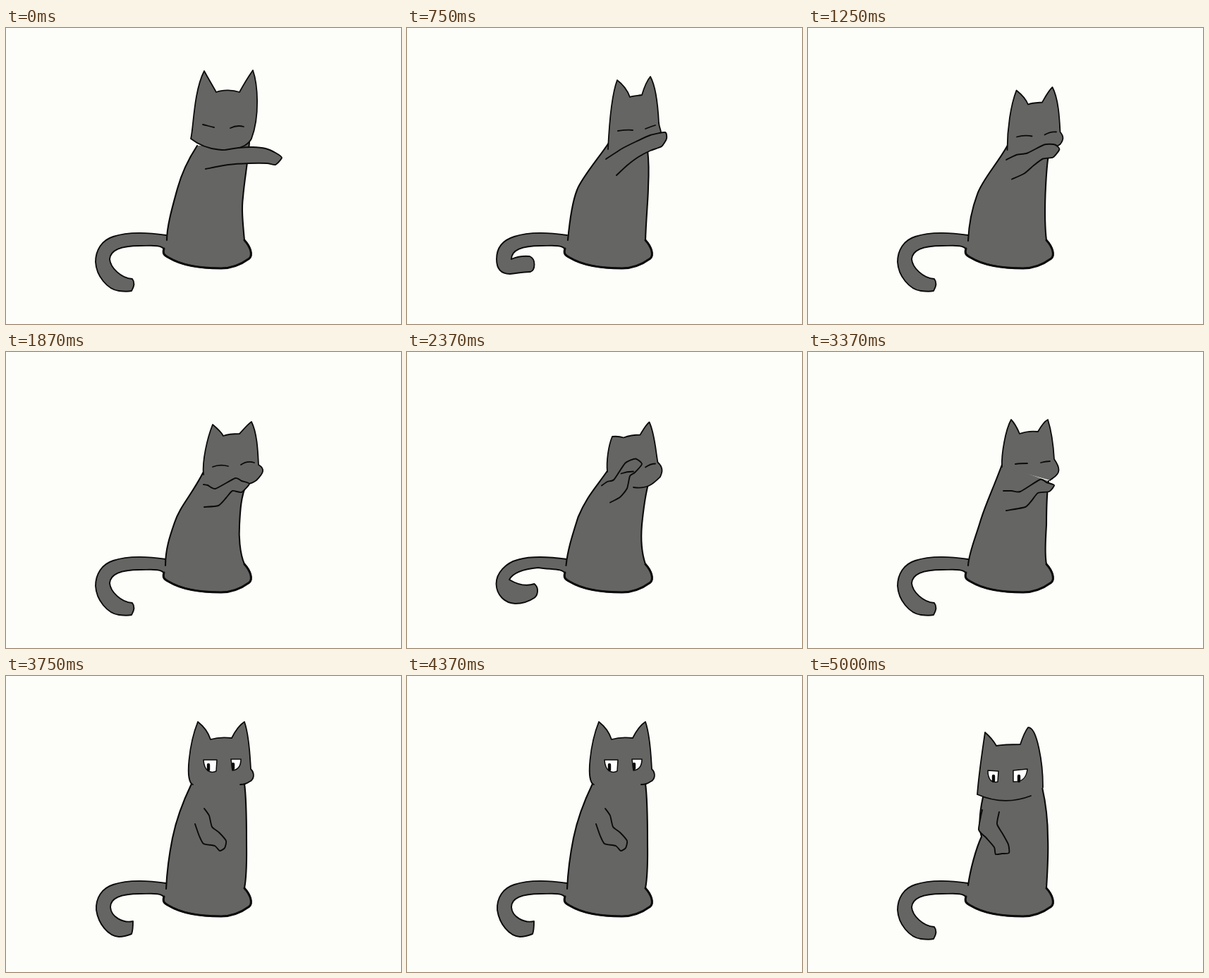
Animation of 560 by 420 pixels, one loop 5.25 s. Source, as an HTML page with a canvas:

```html
<!DOCTYPE html>
<html lang="en">
<head>
<meta charset="utf-8">
<title>Cat washing itself</title>
<style>
html, body { margin: 0; width: 100%; height: 100%; overflow: hidden; background: #fdfef9; }
canvas { display: block; }
</style>
</head>
<body>
<canvas id="stage" width="560" height="420"></canvas>
<script>
const ctx = document.getElementById('stage').getContext('2d');
const FUR = '#656563', PAPER = '#fdfef9', INK = '#0b0b0b';
const LOOP = 5250, STEP = 125;

const BASE = 'M224 313C222 319 223 322 231 326C246 335 268 341 305 341C322 341 334 335 345 327C350 322 347 311 338 301';
const MARKS = 'M206 85L226 89M213 58L232 73M236 40L243 62';

// A pose: body sides, head outline with chin, arm points, closed lids, open eyes, pupils
const pose = (left, right, head, arm, lids, whites = '', pupils = '') =>
  ({ body: left + BASE + right, head, arm, lids, whites, pupils });

const lick = pose(
  'M271 167C254 193 246 217 243 228C235 257 228 282 228 301',
  'C335 270 334 255 336 240C338 215 343 190 345 162',
  'M262 157C266 142 266 90 281 61C287 72 293 82 298 91C308 87 322 88 331 91C337 80 343 70 350 60C357 80 360 125 348 157C346 161 343 164 338 167M338 167C318 177 285 175 262 157',
  '311 173 330 170 350 169 368 171 382 177 391 184 382 194 370 192 345 192 315 194 283 200',
  'M279 137C284 138 290 140 295 141M318 142C324 139 330 138 337 140');

const wipe = pose(
  'M286 163C273 183 247 213 241 230C233 250 230 280 228 301',
  'C339 270 342 240 342 225C343 205 343 190 341 173',
  'M285 172C287 130 290 95 298 74C306 80 312 87 316 98C320 96 328 96 333 95C336 85 340 75 345 69C354 85 356 115 357 135C358 142 360 145 360 148M360 148C345 158 322 166 300 180',
  '282 186 305 171 325 161 345 152 366 148 368 157 361 168 345 174 328 183 312 195 297 209',
  'M299 146C306 145 313 144 320 145M338 143C343 141 348 139 352 138');

const nibble = pose(
  'M280 170C262 205 247 218 239 242C232 262 226 280 226 303',
  'C331 285 330 260 331 245C332 225 333 205 341 187',
  'M280 174C278 155 285 123 293 103C299 108 305 113 308 119C316 116 324 116 331 116C337 110 342 103 348 99C356 115 357 140 358 160C368 166 365 172 355 182M355 182C350 186 345 187 341 188',
  '280 188 286 189 297 194 325 179 334 183 345 187 334 199 321 197 312 207 301 218 281 220',
  'M293 163C300 160 308 160 315 162M333 160C340 155 346 155 352 157');

const ear = pose(
  'M289 166C275 178 262 192 246 227C238 255 229 282 225 303',
  'C334 285 333 265 335 245C338 225 341 210 342 192',
  'M288 166C287 155 286 143 289 137C293 131 300 127 306 124C314 121 322 119 330 119C332 112 335 104 339 100C346 115 348 140 353 153C357 160 361 166 363 172M363 172C350 186 338 203 301 196',
  '272 191 282 179 290 168 294 136 314 120 321 131 312 143 311 155 312 180 303 194 295 207',
  'M314 182C318 181 322 179 327 177M343 167C346 165 349 162 352 160');

const finish = pose(
  'M275 160C260 200 253 213 245 238C237 265 228 285 227 303',
  'C335 285 337 265 338 245C338 225 338 205 341 183',
  'M275 163C274 145 280 110 288 96C294 102 297 109 300 116C308 113 318 112 326 113C330 106 334 99 340 96C346 115 348 135 349 152C358 165 358 172 347 179M347 179C346 180 344 181 343 182',
  '277 197 289 197 301 198 329 181 338 185 349 189 342 198 326 200 317 211 308 220 281 225',
  'M294 159C300 158 306 158 311 158M330 157C334 156 339 155 343 155');

const glance = pose(
  'M263 153C250 180 241 205 236 230C231 255 228 280 227 302',
  'C342 280 341 255 341 235C341 200 341 175 338 153',
  'M265 154C253 150 260 95 272 65C281 72 287 81 290 90C300 87 312 87 320 88C325 78 330 70 338 65C345 85 346 115 347 132C353 138 352 147 345 150M345 150C341 153 336 154 332 154',
  '281 188 288 198 292 214 302 222 312 234 310 244 303 248 296 241 280 238 274 227 268 210',
  '',
  'M280 119L299 119L298 135C292 138 281 137 280 119ZM319 118L333 118C333 127 330 133 321 134Z',
  'M287 126L287 133M322 125L322 131');

const stare = pose(
  'M248 172C243 195 242 215 246 228C238 245 230 275 227 297',
  'C339 285 341 250 340 230C340 200 337 180 332 158',
  'M240 168C241 155 245 120 251 80C258 86 263 92 267 99C278 97 290 97 301 97C304 88 308 78 312 73C325 72 333 125 333 156C333 157 333 157 333 158M316 170C290 180 265 179 240 168',
  '271 193 268 210 276 224 284 239 285 251 275 252 266 253 264 243 253 230 242 218 247 190',
  '',
  'M255 134L270 135L269 150C262 152 255 149 255 134ZM291 134L311 132C310 143 304 151 291 150Z',
  'M263 142L263 149M299 142L299 149');

// Tail: upper edge, bend, tip, inner edge; the last point only tucks the fill under the body
const tail = bend => 'M227 294C205 291 ' + bend + 'C205 309 220 307 224 314M236 305';
const low = tail('176 288 152 296C136 301 127 315 127 332C128 352 144 371 160 373C168 374 174 374 178 373C181 368 183 361 179 356C163 355 148 340 147 328C148 314 165 309 190 309');
const hook = tail('176 288 152 296C136 301 127 312 127 328C127 342 134 349 146 349C156 348 164 346 175 346C182 343 183 328 174 324C164 323 157 324 148 328C148 314 165 309 190 309');
const curl = tail('183 289 164 293C144 297 126 312 126 326C126 339 134 342 147 341C158 340 172 334 184 324C191 320 191 307 182 302C174 311 162 318 143 318C152 312 166 307 182 303');
const lift = tail('176 288 152 296C136 301 127 315 128 332C131 352 145 369 160 370C166 370 173 368 178 366C180 361 180 355 180 348C166 351 149 342 148 328C148 314 165 309 190 309');

// Blends the numbers of two like-built strings; unlike ones switch halfway
function mix(a, b, k) {
  const to = b.match(/[\d.]+/g) || [];
  if ((a.match(/[\d.]+/g) || []).length !== to.length) return k < 0.5 ? a : b;
  let n = 0;
  return a.replace(/[\d.]+/g, v => +v + (to[n++] - v) * k);
}

const blend = (a, b, k) =>
  Object.fromEntries(Object.keys(a).map(key => [key, mix(a[key], b[key], k)]));

const poses = [
  [0, lick], [3, { ...blend(lick, wipe, 0.25), arm: lick.arm }], [5, lick],
  [6, wipe], [8, wipe], [12, nibble], [14, blend(nibble, wipe, 0.15)], [15, nibble],
  [18, ear], [20, nibble], [22, ear], [23, ear], [26, finish], [27, finish],
  [30, glance], [35, glance], [38, stare]
];
const tails = [
  [0, low], [5, low], [6, hook], [7, hook], [10, low], [15, low], [18, curl], [20, low],
  [22, curl], [23, curl], [26, low], [28, low], [30, lift], [32, curl], [35, lift], [38, low]
];

function at(track, step, join) {
  const n = track.findIndex(([s]) => s > step);
  if (n < 0) return track[track.length - 1][1];
  const [s0, a] = track[n - 1], [s1, b] = track[n];
  return join(a, b, (step - s0) / (s1 - s0));
}

// Soft curve through a string of points
function smooth(text) {
  const v = text.split(' ').map(Number), last = v.length / 2 - 1;
  const get = i => { i = Math.max(0, Math.min(last, i)); return [v[2 * i], v[2 * i + 1]]; };
  let d = 'M' + get(0);
  for (let i = 0; i < last; i++) {
    const [p, q, r, s] = [i - 1, i, i + 1, i + 2].map(get);
    const c1 = q.map((x, j) => x + (r[j] - p[j]) / 10);
    const c2 = r.map((x, j) => x - (s[j] - q[j]) / 10);
    d += 'C' + [c1, c2, r];
  }
  return d;
}

// Fills across open gaps, then inks the lines
function draw(d, width, fill) {
  if (fill) {
    ctx.fillStyle = fill;
    ctx.fill(new Path2D(d.replace(/(?<=\d)M/g, 'L')));
  }
  ctx.lineWidth = width;
  ctx.stroke(new Path2D(d));
}

function frame(now) {
  const step = Math.floor((now % LOOP + 5) / STEP);
  const cat = at(poses, step, blend);
  ctx.fillStyle = PAPER;
  ctx.fillRect(0, 0, 560, 420);
  ctx.strokeStyle = INK;
  ctx.lineCap = ctx.lineJoin = 'round';
  draw(at(tails, step, mix), 1.9, FUR);
  draw(cat.body, 2.1, FUR);
  draw(BASE, 3);
  draw(cat.head, 1.8, FUR);
  draw(smooth(cat.arm), 1.9, FUR);
  draw(cat.lids, 1.8);
  draw(cat.whites, 1.5, '#fff');
  draw(cat.pupils, 4.4);
  if (step === 38 || step === 39) draw(MARKS, 2.2);
}

let start;
function tick(now) {
  start ??= now;
  frame(now - start);
  requestAnimationFrame(tick);
}
frame(0);
requestAnimationFrame(tick);
</script>
</body>
</html>
```
